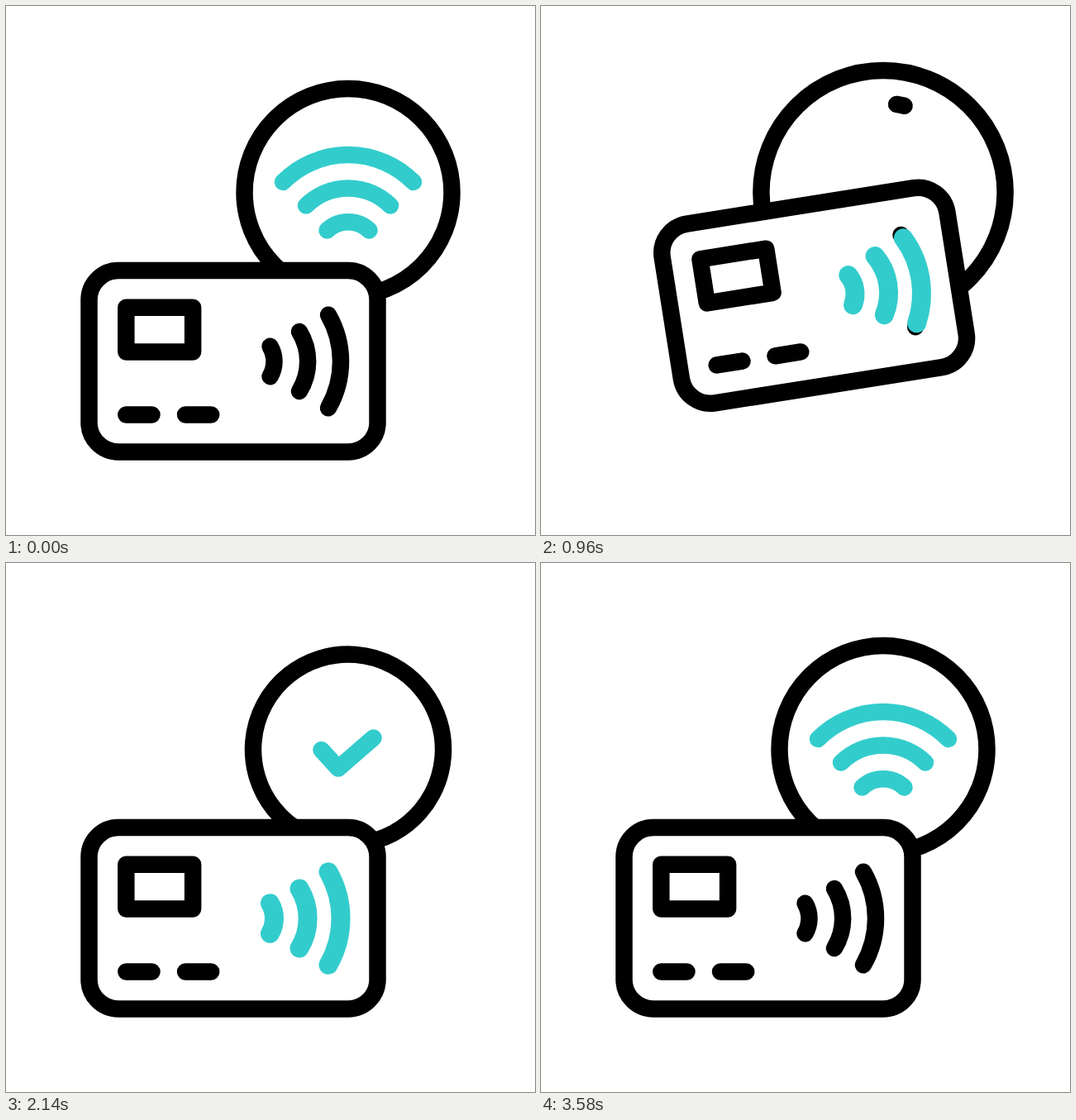
Recreate the animation shown at these times as an HTML page. Size 640x640 px, loop 3.6 s.

```html
<!DOCTYPE html>
<html lang="en">
<head>
<meta charset="utf-8">
<title>Contactless payment</title>
<style>
  @property --p { syntax: "<number>"; inherits: false; initial-value: 0; }
  @property --q { syntax: "<number>"; inherits: false; initial-value: 0; }
  @property --r { syntax: "<number>"; inherits: false; initial-value: 0; }
  @property --a { syntax: "<number>"; inherits: false; initial-value: 0; }

  html, body { margin: 0; width: 100%; height: 100%; overflow: hidden; background: #fff; }
  svg { display: block; width: 100vw; height: 100vh; }
  path, rect, circle {
    fill: none; stroke: #000; stroke-width: 20.5px;
    stroke-linecap: round; stroke-linejoin: round;
  }
  .anim { animation: 3.6s cubic-bezier(.37, 0, .63, 1) infinite; }
  .teal { stroke: #33cccc; }
  .over { stroke-width: 23px; }

  /* --p is the drawn share of a line, opening from its middle or its start */
  .mid, .start {
    stroke-dasharray: calc(var(--p) * 100px) 300px;
    opacity: calc(var(--p) * 1000);
  }
  .mid { stroke-dashoffset: calc((var(--p) - 1) * 50px); }

  .card {
    animation-name: card;
    transform:
      translate(calc(275px + 77.5px * var(--q) * (2 - var(--q))),
                calc(430px - 179.5px * var(--q) * (.892 + .108 * var(--q))))
      rotate(calc(-19.1deg * var(--q)));
  }
  .body { fill: #fff; }
  .ring {
    animation-name: ring;
    r: calc(var(--r) * 1px);
    stroke-width: min(20.5px, calc(var(--r) * .1633px));
  }
  .badge {
    animation-name: badge;
    r: calc(var(--r) * 1px);
    transform: rotate(calc(var(--a) * 1deg));
  }
  .tick { animation-name: tick; }
  .w1 { animation-name: w1; }
  .w2 { animation-name: w2; }
  .w3 { animation-name: w3; }
  .s1 { animation-name: s1; }
  .s2 { animation-name: s2; }
  .s3 { animation-name: s3; }

  @keyframes card {
    0%, 31.32%, 100% { --q: 0; }
    14.8%, 21.7% { --q: 1; }
  }
  @keyframes ring {
    0%, 21.4% { --r: 125.5; }
    28.3% { --r: 150.8; animation-timing-function: cubic-bezier(.12, 0, .39, 0); }
    35.4% { --r: 0; }
    72.33% { --r: 0; animation-timing-function: cubic-bezier(.61, 1, .88, 1); }
    83.1% { --r: 150.8; }
    89.2%, 100% { --r: 125.5; }
  }
  @keyframes badge {
    0%, 25.3% { --p: 0; --r: 108; --a: -81; }
    43.3%, 51.7% { --p: 1; --r: 93.5; --a: -107; }
    57.8% { --p: 1; --r: 119.5; --a: -107; }
    63.9%, 72.6% { --p: 1; --r: 93.5; --a: -107; }
    89.1%, 100% { --p: 0; --r: 93.5; --a: 168; }
  }
  @keyframes tick {
    0%, 38.3%, 82.2%, 100% { --p: 0; }
    47.8%, 72.8% { --p: 1; }
  }
  /* card waves light up one by one, then fade back in the same order */
  @keyframes w1 {
    0%, 10.6%, 88.4%, 100% { --p: 0; }
    16.6%, 82.9% { --p: 1; }
  }
  @keyframes w2 {
    0%, 16.1%, 93.9%, 100% { --p: 0; }
    22.2%, 88.3% { --p: 1; }
  }
  @keyframes w3 {
    0%, 21.8%, 99.1%, 100% { --p: 0; }
    27.8%, 93.6% { --p: 1; }
  }
  /* signal arcs in the ring do the opposite */
  @keyframes s1 {
    0%, 10.6%, 88.6%, 100% { --p: 1; }
    15.6%, 83.3% { --p: 0; }
  }
  @keyframes s2 {
    0%, 15%, 93.9%, 100% { --p: 1; }
    20%, 88.3% { --p: 0; }
  }
  @keyframes s3 {
    0%, 19.4%, 99.1%, 100% { --p: 1; }
    24.4%, 93.6% { --p: 0; }
  }
</style>
</head>
<body>
<svg viewBox="0 0 640 640">
  <g transform="translate(414 225.5)">
    <circle class="anim ring"/>
    <circle class="anim start badge" pathLength="100"/>
    <path class="anim teal mid s1" pathLength="100" d="M-25.5 46A36.8 36.8 0 0 1 25.5 46"/>
    <path class="anim teal mid s2" pathLength="100" d="M-51 16A72.4 72.4 0 0 1 51 16"/>
    <path class="anim teal mid s3" pathLength="100" d="M-79 -12.5A111 111 0 0 1 79 -12.5"/>
    <path class="anim teal start tick" pathLength="100" d="M-32.5 .5L-12 23L30.5 -14"/>
  </g>
  <g class="anim card">
    <rect class="body" x="-174.5" y="-110" width="349" height="219.5" rx="35.5"/>
    <rect x="-129.7" y="-65.3" width="80.8" height="53.8"/>
    <path d="M-129.7 64.5h31.2M-58 64.5h31.2"/>
    <path d="M44.5 -18.25A36 36 0 0 1 44.5 18.25"/>
    <path d="M80 -36A69 69 0 0 1 80 36"/>
    <path d="M115 -56.25A113 113 0 0 1 115 56.25"/>
    <path class="anim teal over mid w1" pathLength="100" d="M44.5 -18.25A36 36 0 0 1 44.5 18.25"/>
    <path class="anim teal over mid w2" pathLength="100" d="M80 -36A69 69 0 0 1 80 36"/>
    <path class="anim teal over mid w3" pathLength="100" d="M115 -56.25A113 113 0 0 1 115 56.25"/>
  </g>
</svg>
</body>
</html>
```
